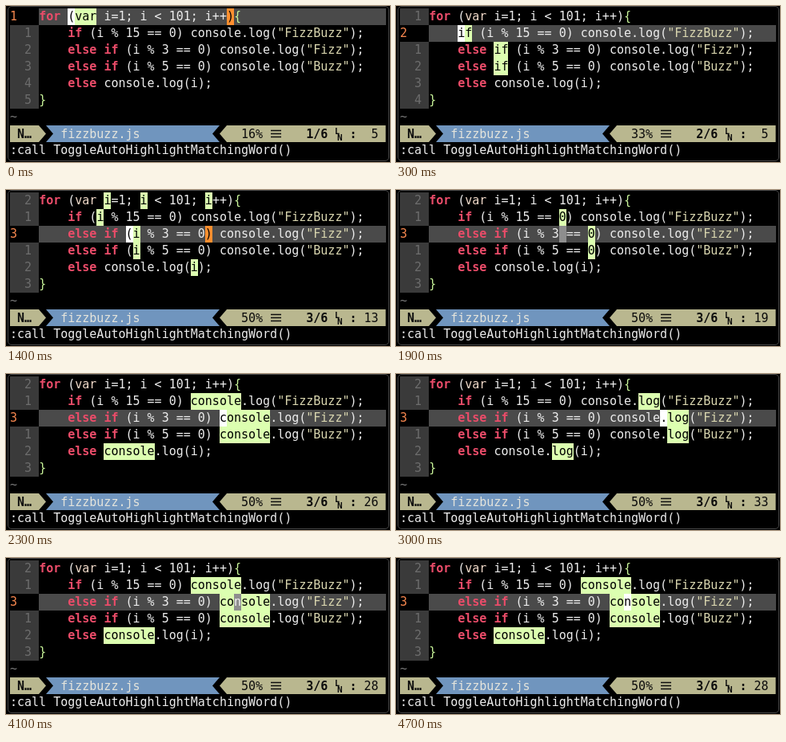
These frames come from a looping animation (480x196 px, 5.1 s). An HTML page:

```html
<!DOCTYPE html>
<html lang="en">
<head>
<meta charset="utf-8">
<style>
html, body { margin: 0; width: 100%; height: 100%; overflow: hidden; background: #000; }
#term { position: absolute; left: 0; top: 0; width: 480px; height: 196px; overflow: hidden; background: #000;
  color: #ececec; font: 15px/21px "DejaVu Sans Mono", "Noto Sans Mono", monospace; white-space: pre; }
#frame { position: absolute; left: 2px; top: 0; width: 475px; height: 193px; border: 1px solid #484848; border-radius: 5px; }
.row { position: absolute; left: 5px; width: 469.6px; height: 21px; }
.row span { display: inline-block; height: 21px; vertical-align: top; }
.row.cur { background: linear-gradient(90deg, transparent 36px, #4a4a4a 36px); }
.num { color: #6c6c6c; background: #3a3a3a; }
.cur .num { color: #f6864e; background: #000; }
.key { color: #ea4c69; font-weight: bold; }
.var { color: #f3dccb; }
.str { color: #dad7b0; }
.brace { color: #c9f69a; }
.row .hit { color: #000; background: #dcffb0; font-weight: normal; }
.row .pair { color: #000; background: #fd8f2f; }
.row .on { color: #000; background: #fff; }
.row .dim { color: #f4f4f4; background: #8e8e8e; }
#bar { position: absolute; left: 0; top: 150px; }
#bar text { fill: #0c0c0c; white-space: pre; }
</style>
</head>
<body>
<div id="term">
  <div id="frame"></div>
  <div id="code"></div>
  <div class="row" style="top:129px;color:#777">~</div>
  <svg id="bar" width="480" height="21">
    <path fill="#b9b78f" d="M5 0H41L50 10.5 41 21H5zM474.6 0H276L267 10.5 276 21H474.6z"/>
    <path fill="#7095be" d="M50 0H267L258 10.5 267 21H50L59 10.5z"/>
    <text x="14" y="16" font-weight="bold">N…</text>
    <text x="68.2" y="16" style="fill:#e4e4dc">fizzbuzz.js</text>
    <text id="pct" x="294" y="16"></text>
    <path stroke="#0c0c0c" stroke-width="1.6" d="M331 6.5h13M331 10.5h13M331 14.5h13"/>
    <text id="line" x="375.2" y="16" font-weight="bold"></text>
    <text x="411" y="11" font-size="10" font-weight="bold">L</text>
    <text x="414" y="19" font-size="11" font-weight="bold">N</text>
    <text x="429.4" y="16" font-weight="bold">:</text>
    <text id="col" x="465.5" y="16" text-anchor="end"></text>
  </svg>
  <div class="row" style="top:171px">:call ToggleAutoHighlightMatchingWord()</div>
</div>
<script>
const LOOP = 5100, ROW = 21, TOP = 3;
const lines = [
  'for (var i=1; i < 101; i++){',
  '    if (i % 15 == 0) console.log("FizzBuzz");',
  '    else if (i % 3 == 0) console.log("Fizz");',
  '    else if (i % 5 == 0) console.log("Buzz");',
  '    else console.log(i);',
  '}'
];
const syntax = [
  [/\b(for|if|else)\b/g, 'key'],
  [/\bvar\b/g, 'var'],
  [/"[^"]*"/g, 'str'],
  [/[{}]/g, 'brace']
];
// time, line, column; the column glides between entries of the same line
const moves = [
  [0, 1, 5], [200, 2, 5], [500, 3, 5], [700, 3, 5], [1000, 3, 8], [1900, 3, 19],
  [2800, 3, 34], [2900, 3, 34], [3000, 3, 33], [3400, 3, 30], [3700, 3, 28], [LOOP, 3, 28]
];
// time, cursor look
const blink = [
  [0, 'on'], [1000, 'dim'], [1100, 'on'], [1900, 'dim'], [2000, 'on'], [3400, 'dim'],
  [3500, 'on'], [4100, 'dim'], [4200, ''], [4600, 'dim'], [4700, 'on']
];
const $ = id => document.getElementById(id);
const last = (table, t) => table.findLastIndex(step => step[0] <= t);

function cursorAt(t) {
  const k = last(moves, t);
  const [t0, line, c0] = moves[k];
  const [t1, nextLine, c1] = moves[k + 1];
  const p = line === nextLine ? (t - t0) / (t1 - t0) : 0;
  return { line, col: Math.round(c0 + (c1 - c0) * p), look: blink[last(blink, t)][1] };
}

function paint(classes, text, re, name) {
  for (const m of text.matchAll(re))
    for (let i = 0; i < m[0].length; i++) classes[m.index + i] += ' ' + name;
}

// Word under the cursor, or the next one after it
function wordAt(text, at) {
  for (const m of text.matchAll(/\w+/g))
    if (m.index + m[0].length > at) return m[0];
}

function pairOf(text, at) {
  const dir = { '(': 1, ')': -1 }[text[at]];
  if (!dir) return -1;
  let depth = 0;
  for (let i = at; i >= 0 && i < text.length; i += dir) {
    if (text[i] === '(') depth++;
    if (text[i] === ')') depth--;
    if (!depth) return i;
  }
  return -1;
}

const escape = s => s.replace(/&/g, '&amp;').replace(/</g, '&lt;');
const span = (cls, s) => `<span class="${cls}">${escape(s)}</span>`;

function renderLine(text, n, cur, word) {
  const cls = Array(text.length).fill('');
  for (const [re, name] of syntax) paint(cls, text, re, name);
  paint(cls, text, new RegExp(`\\b${word}\\b`, 'g'), 'hit');
  const here = n === cur.line;
  if (here) {
    const at = cur.col - 1, pair = pairOf(text, at);
    if (pair >= 0) cls[pair] += ' pair';
    cls[at] += ' ' + cur.look;
  }
  const num = here ? `${n}   ` : `  ${Math.abs(n - cur.line)} `;
  let html = span('num', num);
  for (let i = 0, j; i < text.length; i = j) {
    for (j = i + 1; j < text.length && cls[j] === cls[i];) j++;
    html += span(cls[i], text.slice(i, j));
  }
  return `<div class="row${here ? ' cur' : ''}" style="top:${TOP + (n - 1) * ROW}px">${html}</div>`;
}

let shown = '';
function draw(t) {
  const cur = cursorAt(t), key = Object.values(cur).join();
  if (key === shown) return;
  shown = key;
  const word = wordAt(lines[cur.line - 1], cur.col - 1);
  $('code').innerHTML = lines.map((s, i) => renderLine(s, i + 1, cur, word)).join('');
  $('pct').textContent = Math.floor(cur.line * 100 / lines.length) + '%';
  $('line').textContent = `${cur.line}/${lines.length}`;
  $('col').textContent = cur.col;
}

const start = performance.now();
function tick() {
  const t = (performance.now() - start) % LOOP;
  draw(Math.floor(t / 100) * 100);
  requestAnimationFrame(tick);
}
draw(0);
requestAnimationFrame(tick);
</script>
</body>
</html>
```
